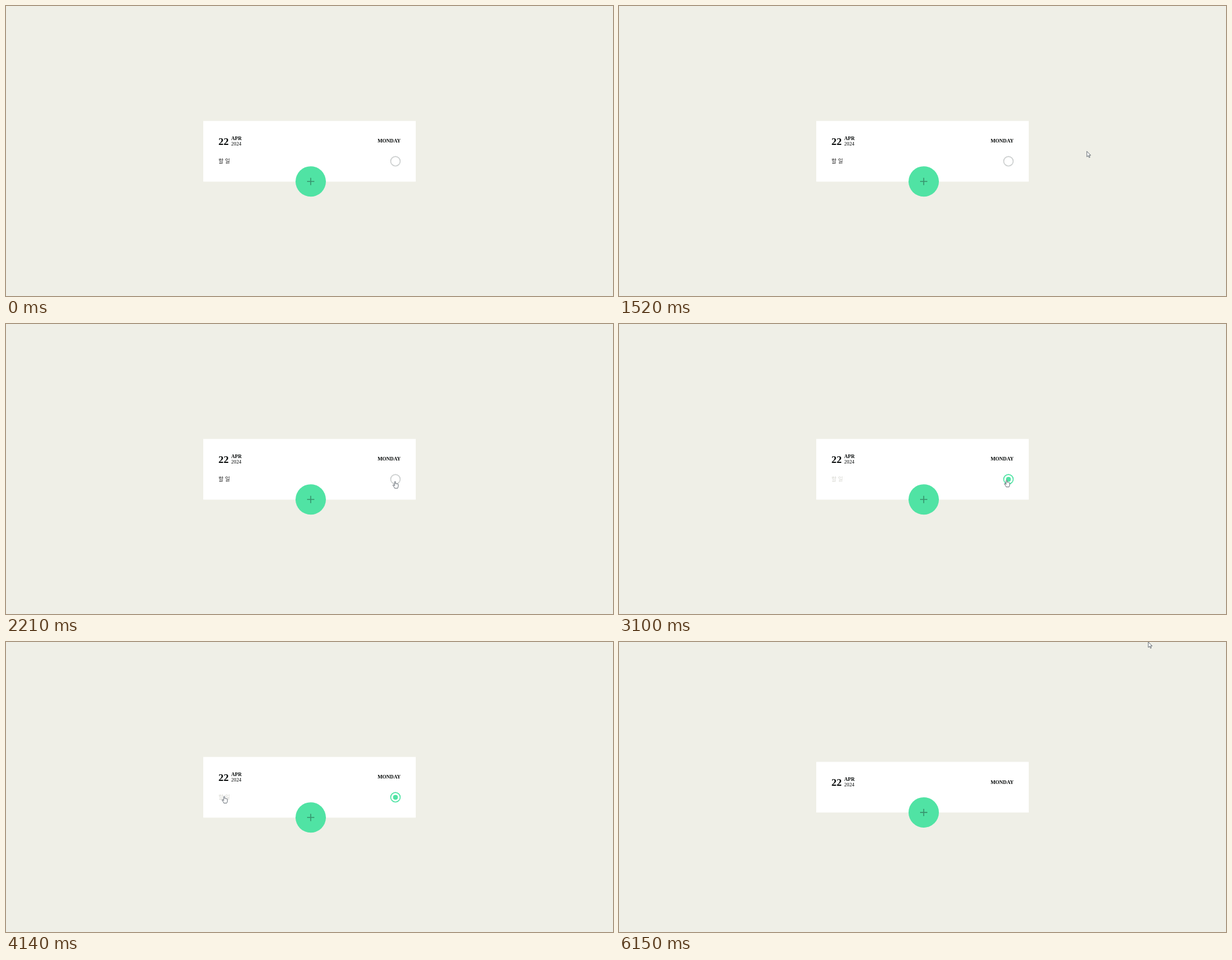
Recreate the animation shown at these times as an HTML page. Size 1000 by 478 pixels, loop 6.25 s.

```html
<!DOCTYPE html>
<html lang="en">
<head>
<meta charset="utf-8">
<title>To-do card</title>
<style>
  html, body { margin: 0; width: 100%; height: 100%; overflow: hidden; background: #efefe7; }
  svg { display: block; width: 100%; height: 100%; }
  text { font-family: "Liberation Serif", "Times New Roman", serif; font-size: 8.4px; fill: #050808; }
  .bold { font-weight: 700; }
  .day { font-size: 16.8px; }
  .task { font-family: "Noto Sans CJK KR", "Noto Sans CJK", sans-serif; font-size: 9px; }
  .cursor { fill: #fff; stroke: #3c4650; stroke-width: 1.3; stroke-linejoin: round; }
</style>
</head>
<body>
<svg viewBox="0 0 1000 478">
  <rect id="card" x="325" width="350" fill="#fff"/>
  <g id="header">
    <text class="bold day" x="350" y="228.7">22</text>
    <text class="bold" x="371" y="221">APR</text>
    <text x="371" y="229.6" fill="#222">2024</text>
    <text class="bold" x="650" y="225.4" text-anchor="end">MONDAY</text>
  </g>
  <g id="item">
    <text id="task" class="task" x="350" y="258.6" lang="ko">할 일</text>
    <circle id="ring" cx="641.6" cy="255.9" r="7.8" fill="none" stroke-width="1.6"/>
    <circle id="dot" cx="641.6" cy="255.9" r="4" fill="#50e3a4"/>
  </g>
  <g id="button">
    <circle r="25" fill="#50e3a4"/>
    <path d="M-6 0H6M0-6V6" stroke="#38966f" stroke-width="1.6"/>
  </g>
  <path id="arrow" class="cursor" d="M0 0V15.5L3.7 12.2L6.2 17.8L8.6 16.8L6.2 11.3H11Z"/>
  <path id="hand" class="cursor" d="M-1.5 10V1.5Q0-1 1.5 1.5V7Q3 5.6 4.2 7.4Q5.8 6 7 7.9Q9-1 9.2 9V14Q8.8 17 7 20H-1Q-2 17-6 12Q-6.5 9.5-4 10L-1.5 13Z"/>
</svg>
<script>
const LOOP = 6250, DELETE_AT = 4960;
const el = id => document.getElementById(id);
const [card, header, item, task, ring, dot, button, arrow, hand] =
  ["card", "header", "item", "task", "ring", "dot", "button", "arrow", "hand"].map(el);

hand.setAttribute("d",
  "M-1.5 11V1.5Q0-1 1.5 1.5V7Q3 5.6 4.2 7.4Q5.8 6 7 8Q8.8 7 9 9.5V14Q8.8 17 7 20H-1Q-2 17-6 12Q-6.5 9.5-4 10L-1.5 13Z");

const clamp = v => Math.max(0, Math.min(1, v));
const easeOut = p => 1 - (1 - p) ** 2;
const easeInOut = p => p * p * (3 - 2 * p);
const linear = p => p;
const mix = (a, b, p) => a + (b - a) * p;
const mixColor = (a, b, p) => `rgb(${a.map((v, i) => Math.round(mix(v, b[i], p)))})`;

// Each stop: time, x, y, easing used on the way to it.
const path = [
  [1340, 990, 124, linear],
  [1740, 677, 289, easeOut],
  [1910, 662, 277, linear],
  [2040, 652, 269, linear],
  [2340, 638.5, 257, easeOut],
  [3100, 638.5, 257, linear],
  [3710, 368, 256, easeInOut],
  [3860, 361, 254.5, linear],
  [4140, 359.5, 254, linear],
  [DELETE_AT, 359.5, 254, linear],
  [DELETE_AT, 144, 151, linear],
  [5630, 144, 151, linear],
  [6150, 872, 0, easeInOut],
  [LOOP, 872, 0, linear]
];

function cursorAt(t) {
  if (t < path[0][0]) return null;
  const next = path.findIndex(stop => stop[0] > t);
  const [t0, x0, y0] = path[next - 1];
  const [t1, x1, y1, ease] = path[next];
  const p = ease((t - t0) / (t1 - t0));
  return [mix(x0, x1, p), mix(y0, y1, p)];
}

function place(node, x, y, scale = 1) {
  node.setAttribute("transform", `translate(${x} ${y}) scale(${scale})`);
}

function show(node, visible) {
  node.style.display = visible ? "" : "none";
}

function render(t) {
  const removed = t >= DELETE_AT;
  const checked = clamp((t - 2550) / 100);

  card.setAttribute("y", removed ? 197.6 : 189.5);
  card.setAttribute("height", removed ? 83.4 : 100);
  place(header, 0, removed ? 8.3 : 0);
  place(button, 502, removed ? 280.9 : 289.2);

  show(item, !removed);
  task.style.fill = mixColor([35, 35, 35], [214, 214, 207], checked);
  ring.style.stroke = mixColor([204, 207, 207], [80, 227, 164], checked);
  dot.style.opacity = checked;

  const pos = cursorAt(t);
  const overCheck = pos && Math.hypot(pos[0] - 641.6, pos[1] - 255.9) < 9;
  const overTask = pos && pos[0] > 350 && pos[0] < 369 && pos[1] > 249 && pos[1] < 262;
  const pointing = !removed && (overCheck || overTask);
  show(hand, pos && pointing);
  show(arrow, pos && !pointing);
  if (pos) place(pointing ? hand : arrow, ...pos, 0.58);
}

const start = performance.now();
function tick() {
  render((performance.now() - start) % LOOP);
  requestAnimationFrame(tick);
}
tick();
</script>
</body>
</html>
```
